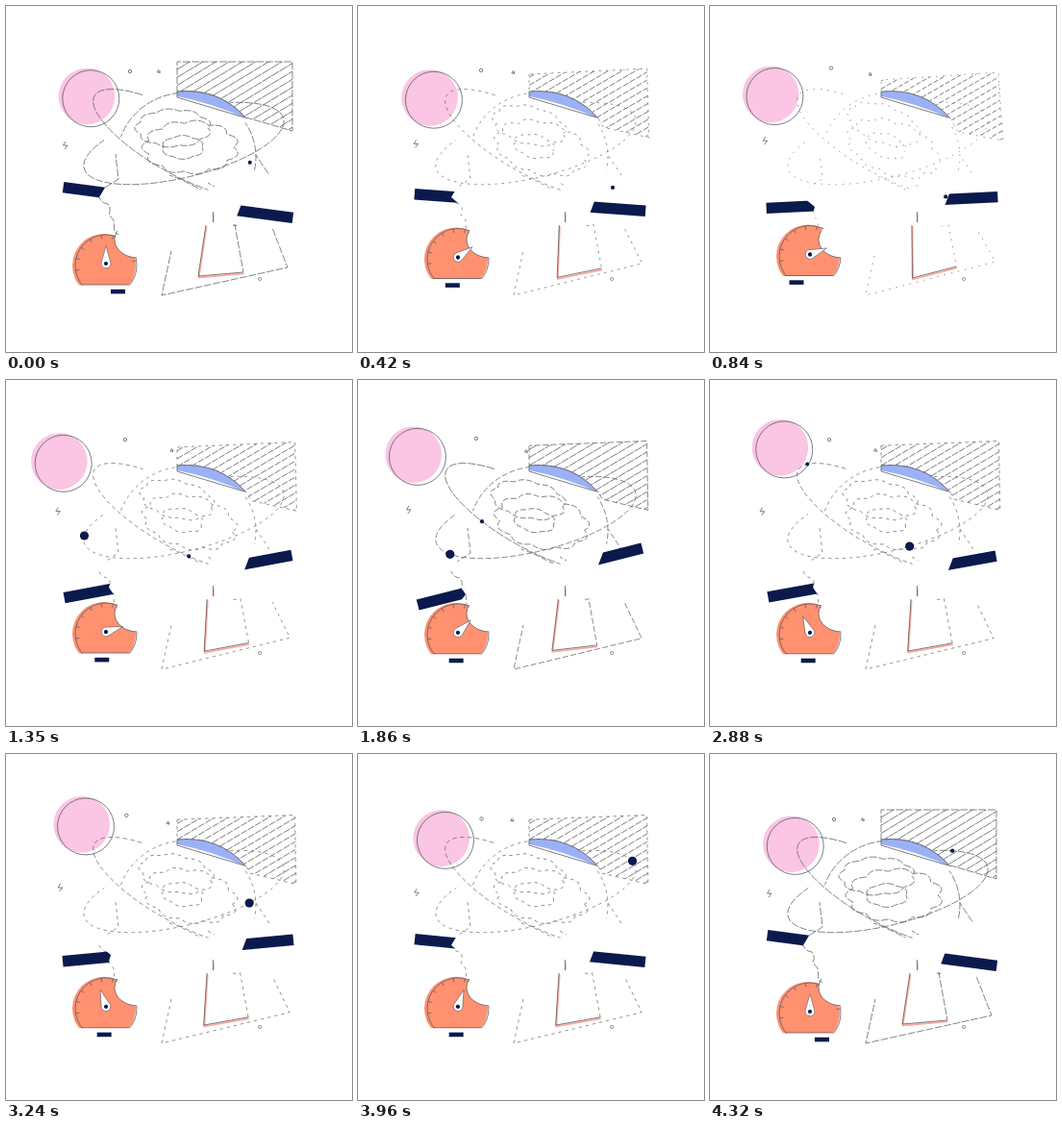
Recreate the animation shown at these times as an HTML page with a canvas. Size 360 by 360 pixels, loop 4350 ms.

```html
<!DOCTYPE html>
<html lang="en">
<head>
<meta charset="utf-8">
<title>Thinking machine</title>
<style>
  html, body { margin: 0; width: 100%; height: 100%; overflow: hidden; background: #fff; }
  canvas { display: block; width: 360px; height: 360px; }
</style>
</head>
<body>
<canvas id="stage"></canvas>
<script>
const LOOP = 4350, DEG = Math.PI / 180;
const PINK = '#fbc5e4', BLUE = '#9bb1f5', ORANGE = '#ff9170', NAVY = '#0a1a4c', SALMON = '#ffaaa0', INK = '#5c5c60';
const { sin, cos, exp, PI } = Math;
const canvas = document.getElementById('stage');
const ctx = canvas.getContext('2d');
const ratio = window.devicePixelRatio || 1;
canvas.width = canvas.height = 360 * ratio;

const ease = u => {
  const k = Math.min(1, Math.max(0, u));
  return k * k * (3 - 2 * k);
};
const bump = (t, peak, width) => exp(-(((t - peak) / width) ** 2));

// Every moving value at time t; a is the phase of the loop.
function pose(t) {
  const a = t / LOOP * 2 * PI;
  const hold = ease(t / 450) * ease((LOOP - 30 - t) / 350);
  const settle = hold * (.54 + .46 * bump(t, 840, 400));
  const neck = settle - .36 * bump(t, 1860, 350);
  return {
    settle,
    neck,
    clarity: .95 - .8 * neck,
    pink: [70.8 + 15.2 * cos(a + .76) + 2.2 * cos(2 * a), 82.5 + 12.5 * cos(a - .64) + 1.5 * cos(2 * a)],
    beam: -4.7 + 11 * cos(a + .09) + 1.3 * cos(2 * a),
    needle: hold * (28 + 47 * cos(a - 1.36) - 8 * sin(2 * a)),
    bigBall: onOrbit(wideOrbit, -48 * DEG - a - 10 * DEG * sin(a)),
    bigRadius: 4.6 * ease((t - 1150) / 200) * ease((LOOP - t) / 60),
    smallBall: onOrbit(steepOrbit, -40 * DEG + a),
    smallRadius: 2.1 * ease((3050 - t) / 200)
  };
}

const wideOrbit = { x: 185, y: 143, rx: 107, ry: 35, tilt: -14 * DEG };
const steepOrbit = { x: 178, y: 142.5, rx: 99, ry: 31, tilt: 29.7 * DEG };

function onOrbit({ x, y, rx, ry, tilt }, angle) {
  const u = rx * cos(angle), v = ry * sin(angle);
  return [x + u * cos(tilt) - v * sin(tilt), y + u * sin(tilt) + v * cos(tilt)];
}

function arc({ x, y, rx, ry, tilt = 0 }, from, to) {
  const path = new Path2D();
  path.ellipse(x, y, rx, ry, tilt, from * DEG, to * DEG);
  return path;
}

const disc = (x, y, r) => arc({ x, y, rx: r, ry: r }, 0, 360);

function fill(shape, color) {
  ctx.fillStyle = color;
  ctx.fill(shape);
}

function stroke(shape, width = .8, color = INK) {
  ctx.strokeStyle = color;
  ctx.lineWidth = width;
  ctx.stroke(shape);
}

function layer(draw) {
  ctx.save();
  draw();
  ctx.restore();
}

function rotated(x, y, angle, draw) {
  layer(() => {
    ctx.translate(x, y);
    ctx.rotate(angle);
    draw();
  });
}

// Pen lines break into shorter strokes as the clarity falls.
function sketch(v, draw) {
  layer(() => {
    ctx.setLineDash([1.5 + 7 * v * v, 6.5 - 5 * v]);
    ctx.lineDashOffset = 14 * v;
    ctx.globalAlpha = .7 + .25 * v;
    draw();
  });
}

function cloud(x, y, rx, ry, bumps, bulge) {
  const path = new Path2D();
  const point = (i, k) => {
    const a = i / bumps * 2 * PI;
    return [x + cos(a) * rx * k, y + sin(a) * ry * k];
  };
  path.moveTo(...point(0, 1));
  for (let i = 0; i < bumps; i++) path.quadraticCurveTo(...point(i + .5, bulge), ...point(i + 1, 1));
  return path;
}

const capTop = 'M178 89 Q222 85 250 117';
const cap = new Path2D(`${capTop} Q214 101 178 94 Z`);
const capEdge = new Path2D(`${capTop} M178 89 V95 L248 116`);
const head = { x: 188, y: 157, rx: 72, ry: 67 };
const figure = [
  arc(wideOrbit, -58, 222),
  arc(head, 198, 263),
  arc(head, -32, 12),
  new Path2D('M114 154 L117 180 L103 189 M97 199 Q99 205 106 206 Q110 211 107 217 L112 223 L113 235 L117 238'),
  new Path2D('M260 155 L274 176 M170 176 L181 180 L203 191 M210 184 L217 188 M236 228 L242 229')
];
const brain = [
  cloud(174, 127, 36, 18, 9, 1.3),
  cloud(192, 147, 45, 25, 11, 1.3),
  cloud(184, 147, 20, 11, 6, 1.4)
];
const beamWindow = new Path2D('M0 0 H115 V178 L103 189 L97 199 L109 209 L107 216 L112 223 L106 231 L0 360 Z M360 0 V360 H232 L240 219 L257 174 Z');
const notch = { x: 137, y: 243, rx: 24, ry: 19 };
const gaugeWindow = new Path2D('M0 0 H360 V360 H0 Z');
gaugeWindow.addPath(arc(notch, 0, 360));

function drawHatch(p, v) {
  const sag = p * (1 - p);
  const area = new Path2D(`M178 ${58 + 19 * p} L${298 + 2 * p + 6 * sag} ${58 + 11 * p - 2 * sag}
    L${298 + 7 * p} ${130 + 10 * p} L${250 + 8 * p} ${116 + 15 * p} L250 117 Q222 85 178 89 Z`);
  layer(() => {
    ctx.clip(area);
    const lines = new Path2D();
    for (let y = 66; y < 250; y += 8.3) {
      lines.moveTo(178, y + 12 * p);
      lines.lineTo(310, y - 80 + 16 * p);
    }
    ctx.setLineDash([4 + 6 * v, 2.4 - 1.8 * v]);
    stroke(lines);
  });
  sketch(v, () => stroke(area));
}

function drawFigure(p, v) {
  sketch(v, () => {
    figure.forEach(path => stroke(path));
    stroke(new Path2D(`M172 255 L162 301 L${293 + 4 * p} ${272 - 6 * p} L277 231`));
    rotated(188, 144, .35 * p, () => {
      ctx.translate(-188, -144);
      brain.forEach(path => stroke(path));
    });
  });
  sketch(Math.min(1, v * 1.3), () => stroke(arc(steepOrbit, 58, 236)));
}

function drawMarks(q) {
  stroke(disc(129 - 6 * q, 68 - 7 * q, 1.7));
  stroke(disc(264, 284, 1.6), .6);
  rotated(62 - 9 * q, 145 - 10 * q, 0, () => stroke(new Path2D('M0 -4 L-2.5 0 L2 0 L-1 4')));
  rotated(159 + 16 * q, 68 + 6 * q, 0, () => stroke(new Path2D('M0 -2 L-1.5 1 H1.5 M1 -1 V2')));
}

function drawBeam(angle) {
  layer(() => {
    ctx.clip(beamWindow);
    rotated(179, 204.5, angle * DEG, () => {
      ctx.fillStyle = NAVY;
      ctx.fillRect(-120.5, -5.7, 241, 11.4);
    });
  });
}

function drawNeck(n, v) {
  const left = `${200 + 10.5 * n} ${281 + 2 * n}`;
  const right = `${247 + 9.5 * n} ${277 - 6 * n}`;
  const side = new Path2D(`M${208 + 2 * n} 228 L${left} L${right}`);
  rotated(.6, 1.4, 0, () => stroke(side, 1.8, SALMON));
  stroke(side, .8);
  stroke(new Path2D('M216 217 V225'), 1.4, SALMON);
  stroke(new Path2D('M215.5 214 V225'));
  sketch(v, () => stroke(new Path2D(`M${right} L${238 + 10 * n} 227`)));
}

function drawGauge(p, angle) {
  const y = 270 - 9.5 * p;
  layer(() => {
    ctx.clip(gaugeWindow, 'evenodd');
    ctx.beginPath();
    ctx.rect(60, 200, 90, y - 179.5);
    ctx.clip();
    fill(disc(102, y, 33), ORANGE);
    const rim = disc(104, y, 32);
    for (let i = 0; i < 9; i++) {
      const a = PI * (.95 + i / 8);
      rim.moveTo(104 + 28 * cos(a), y + 28 * sin(a));
      rim.lineTo(104 + 32 * cos(a), y + 32 * sin(a));
    }
    rim.moveTo(78, y + 20);
    rim.lineTo(128, y + 20);
    stroke(rim);
  });
  stroke(arc(notch, 92, 208));
  rotated(104, y - 2, angle * DEG, () => {
    const needle = new Path2D('M0 -18.5 L4.6 -1.8 A4.9 4.9 0 1 1 -4.6 -1.8 Z');
    fill(needle, '#fff');
    stroke(needle, .6);
    fill(disc(0, 0, 2.1), NAVY);
  });
  ctx.fillStyle = NAVY;
  ctx.fillRect(109 - 26.5 * p, y + 24.8, 15, 4.6);
}

function draw(t) {
  const now = pose(t), [x, y] = now.pink;
  ctx.setTransform(ratio, 0, 0, ratio, 0, 0);
  ctx.fillStyle = '#fff';
  ctx.fillRect(0, 0, 360, 360);

  fill(disc(x, y, 29.3), PINK);
  stroke(disc(x + 4.3, y + 2.2, 29.5));
  drawHatch(now.settle, now.clarity);
  drawFigure(now.settle, now.clarity);
  fill(cap, BLUE);
  stroke(capEdge);
  drawMarks((7.5 - now.beam) / 21.5);
  drawBeam(now.beam);
  drawNeck(now.neck, now.clarity);
  drawGauge(now.settle, now.needle);
  fill(disc(...now.bigBall, now.bigRadius), NAVY);
  fill(disc(...now.smallBall, now.smallRadius), NAVY);
}

const start = performance.now();
function tick() {
  draw((performance.now() - start) % LOOP);
  requestAnimationFrame(tick);
}
tick();
</script>
</body>
</html>
```
